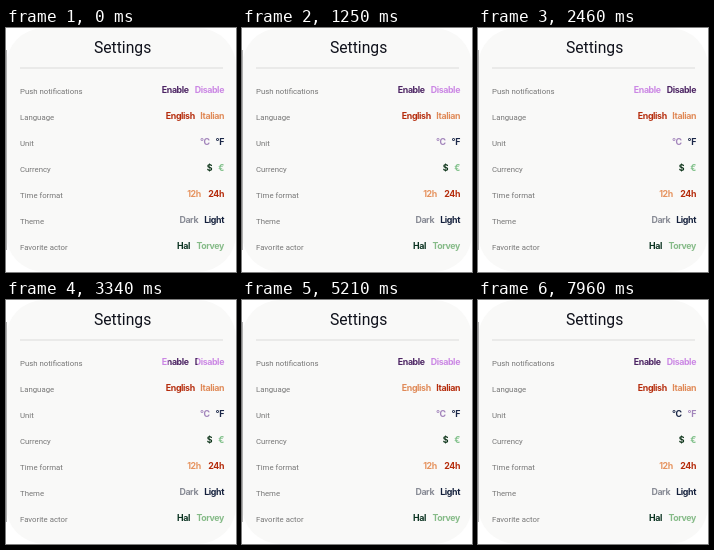
These frames come from a looping animation (230 px wide and 244 px high, 8 s). An HTML page with a canvas:

```html
<!DOCTYPE html>
<html lang="en">
<meta charset="utf-8">
<title>Settings</title>
<style>
  html, body { margin: 0; height: 100%; overflow: hidden; background: #fff; }
  canvas { display: block; width: 230px; height: 244px; }
</style>
<canvas id="stage"></canvas>
<script>
const LOOP = 8000, SLIDE = 390, RIGHT = 218;
const LABEL_FONT = '7.8px Roboto, sans-serif';
const OPTION_FONT = '700 8.8px Inter, sans-serif';
const canvas = document.getElementById('stage');
const ctx = canvas.getContext('2d');
const ratio = window.devicePixelRatio || 1;
canvas.width = 230 * ratio;
canvas.height = 244 * ratio;

// selected: option highlighted at the start of the loop
// toggles: start times of the highlight sliding to the other option
const rows = [
  { label: 'Push notifications', options: ['Enable', 'Disable'], x: 155.8, on: '#4c2463', off: '#cb87e4', selected: 0, toggles: [1780, 3100] },
  { label: 'Language', options: ['English', 'Italian'], x: 159.8, on: '#b52c0c', off: '#e08a58', selected: 0, toggles: [4430, 5730] },
  { label: 'Unit', options: ['°C', '°F'], x: 194, on: '#1b2748', off: '#a284bb', selected: 1, toggles: [7060] },
  { label: 'Currency', options: ['$', '€'], x: 200.8, on: '#0c3318', off: '#80c08a', selected: 0, toggles: [] },
  { label: 'Time format', options: ['12h', '24h'], x: 181.2, on: '#b52c0c', off: '#e69460', selected: 1, toggles: [] },
  { label: 'Theme', options: ['Dark', 'Light'], x: 173.4, on: '#14203c', off: '#888b95', selected: 1, toggles: [] },
  { label: 'Favorite actor', options: ['Hal', 'Torvey'], x: 171, on: '#0b3321', off: '#86bb88', selected: 0, toggles: [] }
];

const ease = p => p < 0.5 ? 4 * p ** 3 : 1 - 4 * (1 - p) ** 3;
const lerp = (a, b, p) => a + (b - a) * p;

function text(string, x, y, font, color, align = 'left') {
  ctx.font = font;
  ctx.fillStyle = color;
  ctx.textAlign = align;
  ctx.fillText(string, x, y);
}

// 0 = left option highlighted, 1 = right option highlighted
function highlight({ selected, toggles }, t) {
  return toggles.reduce((side, start) => {
    const p = Math.min(1, Math.max(0, (t - start) / SLIDE));
    return lerp(side, 1 - side, ease(p));
  }, selected);
}

function drawOptions(row, y, t) {
  ctx.save();
  ctx.letterSpacing = '-0.37px';
  ctx.font = OPTION_FONT;
  const [first, second] = row.options;
  const firstWidth = ctx.measureText(first).width;
  const secondWidth = ctx.measureText(second).width;
  const secondX = RIGHT - secondWidth;
  const side = highlight(row, t);
  const left = lerp(row.x, secondX, side) - 1;
  const width = lerp(firstWidth, secondWidth, side) + 2;

  for (const color of [row.off, row.on]) {
    ctx.save();
    ctx.beginPath();
    ctx.rect(left, y - 10, width, 14);
    if (color === row.off) ctx.rect(140, y - 10, 90, 14);
    ctx.clip('evenodd');
    text(first, row.x, y, OPTION_FONT, color);
    text(second, secondX, y, OPTION_FONT, color);
    ctx.restore();
  }
  ctx.restore();
}

function draw(t) {
  ctx.setTransform(ratio, 0, 0, ratio, 0, 0);
  ctx.fillStyle = '#fff';
  ctx.fillRect(0, 0, 230, 244);
  ctx.fillStyle = '#f9f9f8';
  ctx.beginPath();
  ctx.roundRect(0, 0, 230, 244, 38);
  ctx.fill();
  ctx.fillStyle = '#b0b0b0';
  ctx.fillRect(0, 22, 1, 200);
  ctx.fillStyle = '#dcdcdc';
  ctx.fillRect(14, 39.5, 203, 1);

  text('Settings', 116.6, 24.5, '15.7px Roboto, sans-serif', '#10121c', 'center');
  rows.forEach((row, i) => {
    const y = 66 + i * 26;
    text(row.label, 14, y, LABEL_FONT, '#777');
    drawOptions(row, y - 0.6, t);
  });
}

function tick() {
  draw(performance.now() % LOOP);
  requestAnimationFrame(tick);
}
tick();
</script>
</html>
```
